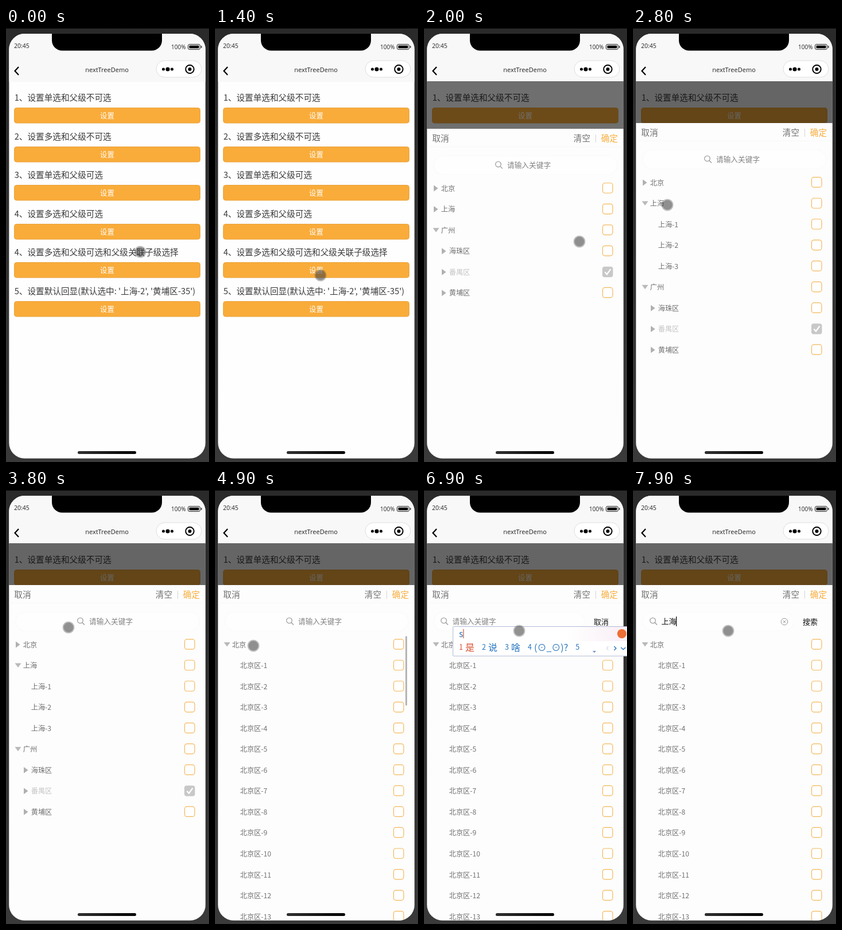
Recreate the animation shown at these times as an HTML page with a canvas. Size 354 by 758 pixels, loop 8000 ms.

```html
<!DOCTYPE html>
<html lang="zh">
<head>
<meta charset="utf-8">
<title>nextTreeDemo</title>
<style>
  html, body { margin: 0; width: 100%; height: 100%; overflow: hidden; background: #333; }
  canvas { display: block; width: 354px; height: 758px; }
</style>
</head>
<body>
<canvas></canvas>
<script>
const W = 354, H = 758, LOOP = 8000, STEP = 100;
const CJK = '"Noto Sans CJK SC", "Noto Sans CJK", sans-serif';
const LATIN = '"Open Sans", "Noto Sans", sans-serif';
const ORANGE = '#f9ac3a', GRAY = '#707070', BLUE = '#2373bd', RED = '#d9502e';
const SHEET_TOP = 166, ROW = 36.53;

const canvas = document.querySelector('canvas');
const ctx = canvas.getContext('2d');
const ratio = window.devicePixelRatio || 1;
canvas.width = W * ratio;
canvas.height = H * ratio;

// Pointer path: [time, x, y]
const PATH = [
  [0, 234, 391], [900, 190, 443], [1400, 184, 432], [1700, 184, 432],
  [2000, 271, 373], [2600, 60, 309], [3000, 60, 309], [3500, 95, 375],
  [3800, 109, 240], [3900, 121, 227], [4400, 67, 272], [5000, 67, 272],
  [5300, 98, 260], [5400, 130, 198], [5500, 130, 198], [5800, 166, 246], [LOOP, 166, 246]
];
const KEY_TIMES = [6900, 7000, 7100, 7200, 7300, 7400, 7600, 7700];
const POPUP_START = 1770, POPUP_LENGTH = 310;
const SHANGHAI_OPEN = 2800, BEIJING_OPEN = 4500, SCROLLBAR_END = 5400;
const SEARCH_FOCUS = 6100, COMMIT = 7800;

function text(str, x, y, size, color, align = 'left', family = CJK) {
  ctx.font = `${size}px ${family}`;
  ctx.fillStyle = color;
  ctx.textAlign = align;
  ctx.textBaseline = 'middle';
  // CJK glyphs sit slightly below the font's nominal middle.
  ctx.fillText(str, x, family === CJK ? y - size * 0.045 : y);
}

function box(x, y, w, h, r, fill, stroke, line = 1) {
  ctx.beginPath();
  ctx.roundRect(x, y, w, h, r);
  if (fill) { ctx.fillStyle = fill; ctx.fill(); }
  if (stroke) { ctx.strokeStyle = stroke; ctx.lineWidth = line; ctx.stroke(); }
}

function circle(x, y, r, fill, stroke, line = 1) {
  box(x - r, y - r, 2 * r, 2 * r, r, fill, stroke, line);
}

function polyline(points, color, line) {
  ctx.beginPath();
  points.forEach(([x, y]) => ctx.lineTo(x, y));
  ctx.strokeStyle = color;
  ctx.lineWidth = line;
  ctx.stroke();
}

function triangle(points, color) {
  ctx.beginPath();
  points.forEach(([x, y]) => ctx.lineTo(x, y));
  ctx.fillStyle = color;
  ctx.fill();
}

function gradient(x0, y0, x1, y1, from, to) {
  const fill = ctx.createLinearGradient(x0, y0, x1, y1);
  fill.addColorStop(0, from);
  fill.addColorStop(1, to);
  return fill;
}

function drawHeader() {
  box(0, 0, W, 94, 0, '#f8f8f8');
  box(80, 2, 192, 37.5, [0, 0, 18, 18], '#000');
  text('20:45', 14, 32, 10.5, '#222', 'left', LATIN);
  text('100%', 288, 34.2, 10, '#222', 'left', LATIN);
  box(317.5, 28.5, 21, 9, 2.5, null, '#222');
  box(319.5, 30.5, 17, 5, 1, '#000');
  box(340, 31, 1.5, 4, 1, '#222');
  polyline([[22, 68], [15.5, 75], [22, 82]], '#000', 2.2);
  text('nextTreeDemo', 176, 74, 11, '#222', 'center', LATIN);
  box(262, 57, 79, 29, 14.5, '#fff', '#dedede');
  [[274.5, 2.5], [282, 3.6], [289.5, 2.5]].forEach(([x, r]) => circle(x, 72, r, '#000'));
  circle(320.5, 72, 7.2, null, '#000', 2);
  circle(320.5, 72, 3, '#000');
}

function drawPage() {
  const titles = ['1、设置单选和父级不可选', '2、设置多选和父级不可选', '3、设置单选和父级可选',
    '4、设置多选和父级可选', '4、设置多选和父级可选和父级关联子级选择',
    "5、设置默认回显(默认选中: '上海-2', '黄埔区-35')"];
  titles.forEach((title, i) => {
    const y = Math.round(122 + i * 67.55);
    text(title, 14.7, y, 14.64, '#3a3a3a');
    box(14.5, y + 17.5, 324, 26.5, 4, ORANGE, '#e9a33c');
    text('设置', 176.5, y + 31.4, 12.4, '#fff', 'center');
  });
}

function treeRows(t) {
  const leaves = (name, count) =>
    Array.from({ length: count }, (_, i) => ({ name: `${name}-${i + 1}`, level: 1, leaf: true }));
  const beijing = t >= BEIJING_OPEN, shanghai = t >= SHANGHAI_OPEN;
  return [
    { name: '北京', level: 0, open: beijing },
    ...(beijing ? leaves('北京区', 13) : []),
    { name: '上海', level: 0, open: shanghai },
    ...(shanghai ? leaves('上海', 3) : []),
    { name: '广州', level: 0, open: true },
    { name: '海珠区', level: 1 },
    { name: '番禺区', level: 1, disabled: true },
    { name: '黄埔区', level: 1 }
  ];
}

function drawRow(row, y) {
  const x = 16 + row.level * 14;
  if (row.open) triangle([[x - 0.5, y - 4], [x + 10.5, y - 4], [x + 5, y + 3.5]], '#b9b9b9');
  else if (!row.leaf) triangle([[x + 1, y - 5.5], [x + 8.5, y], [x + 1, y + 5.5]], '#b0b0b0');
  text(row.name, x + 13.7, y + 0.6, 12.2, row.disabled ? '#c4c4c4' : GRAY);
  if (row.disabled) {
    box(311, y - 9.5, 18.5, 18.5, 4, '#c8c8c8');
    polyline([[315.5, y], [319, y + 4], [325.5, y - 5]], '#fff', 2.2);
  } else {
    box(311.5, y - 9.3, 17.5, 17.5, 4, '#fff', '#f5b75a', 1.2);
  }
}

function drawMagnifier(x, y) {
  circle(x - 1, y - 1, 4.8, null, '#8f8f8f', 1.1);
  polyline([[x + 2.5, y + 2.5], [x + 6.5, y + 6.5]], '#8f8f8f', 1.1);
}

function drawSearch(t) {
  const active = t >= SEARCH_FOCUS, committed = t >= COMMIT;
  box(17, 213, active ? 263 : 320, 33, 16.5, '#fefefe', '#f9f9f9');
  drawMagnifier(active ? 35.5 : 130.5, 229);
  if (committed) {
    text('上海', 49.5, 230, 13, '#111');
    circle(264, 230, 5.8, null, '#999');
    polyline([[261.7, 227.7], [266.3, 232.3]], '#999', 1);
    polyline([[266.3, 227.7], [261.7, 232.3]], '#999', 1);
  } else {
    text('请输入关键字', active ? 49.5 : 145, 229.5, 12.7, '#808080');
  }
  if (active) text(committed ? '搜索' : '取消', 296, 230.2, 13, '#111');
  if (committed) box(75, 221, 1.2, 17, 0, '#000');
  else if (t >= 6200 && t < 6700) box(50, 221, 1.2, 17, 0, '#000');
}

function drawPopup(t) {
  const p = Math.min(1, Math.max(0, (t - POPUP_START) / POPUP_LENGTH));
  if (!p) return;
  box(0, 93, W, H, 0, `rgba(0,0,0,${0.6 * (1 - (1 - p) ** 2)})`);
  ctx.save();
  ctx.beginPath();
  ctx.rect(0, 93, W, H);
  ctx.clip();
  ctx.translate(0, 586 * (1 - p) ** 3);
  box(0, SHEET_TOP, W, H, 0, '#fdfdfd');
  text('取消', 14.3, 183, 14.64, '#707070');
  text('清空', 260.8, 183, 14.64, '#707070');
  box(299, 176, 1, 14, 0, '#d5d5d5');
  text('确定', 308.8, 183, 14.64, ORANGE);
  box(5, 197, 343, 1, 0, '#f7f7f7');
  drawSearch(t);
  treeRows(t).forEach((row, i) => drawRow(row, 270 + i * ROW));
  if (t >= BEIJING_OPEN && t < SCROLLBAR_END) box(332, 255, 3, 121.5, 1.5, '#b5b5b5');
  ctx.restore();
}

function candidatesFor(typed) {
  if (typed === 's') return ['是', '说', '啥', '(⊙_⊙)?', ''];
  if (typed.length < 4) return ['是', '上', '说', '时', '啥'];
  if (typed.length < 6) return ['上', '商', '伤', '尚', '赏'];
  return ['上海', '伤害', '商海', '上'];
}

function drawInputMethod(t) {
  if (t < KEY_TIMES[0] || t >= COMMIT) return;
  const typed = 'shanghai'.slice(0, KEY_TIMES.filter(key => t >= key).length);
  box(50.5, 238.5, 310, 51.5, 1, '#fff', '#b3b9d6');
  box(250, 239, 110, 25, 0, gradient(250, 0, W, 0, '#fff', '#f8eef5'));
  text(typed, 61, 251.5, 15.5, BLUE);
  box(61 + ctx.measureText(typed).width, 243, 1.2, 16, 0, RED);
  let x = 61;
  candidatesFor(typed).forEach((word, i) => {
    const color = i ? BLUE : RED;
    text(i + 1, x, 275, 12.5, color);
    text(word, x + 11, 275.2, 16, color);
    x += 24 + ctx.measureText(word).width;
  });
  triangle([[294, 281], [300, 281], [297, 284.5]], '#7a94c8');
  polyline([[321.5, 273], [318.5, 276.5], [321.5, 280]], '#d8dcec', 1.3);
  polyline([[331.5, 273], [335, 276.5], [331.5, 280]], BLUE, 1.4);
  polyline([[343.5, 275], [347.5, 278.5], [351.5, 275]], BLUE, 1.4);
  circle(345, 251, 8, '#ec6f35');
}

function drawPointer(t) {
  const i = PATH.findIndex(([time]) => time > t);
  const [t0, x0, y0] = PATH[i - 1], [t1, x1, y1] = PATH[i];
  const u = (t - t0) / (t1 - t0), e = u * u * (3 - 2 * u);
  const x = x0 + (x1 - x0) * e, y = y0 + (y1 - y0) * e;
  circle(x, y, 10.5, 'rgba(60,60,60,.32)');
  circle(x, y, 8.5, 'rgba(60,60,60,.36)');
}

function draw(t) {
  ctx.setTransform(ratio, 0, 0, ratio, 0, 0);
  box(0, 0, W, H, 0, gradient(0, 0, 0, H, '#2a2a2a', '#3a3a3a'));
  box(0, 0, W, 1, 0, '#000');
  ctx.save();
  ctx.beginPath();
  ctx.roundRect(5.3, 10, 342.5, 741.7, 27);
  ctx.clip();
  box(0, 0, W, H, 0, '#fefefe');
  drawHeader();
  drawPage();
  drawPopup(t);
  box(125, 739, 102, 5, 2.5, gradient(125, 0, 227, 0, '#303030', '#000'));
  ctx.restore();
  drawInputMethod(t);
  drawPointer(t);
}

const start = performance.now();
function tick() {
  const t = (performance.now() - start) % LOOP;
  draw(Math.floor(t / STEP) * STEP);
  requestAnimationFrame(tick);
}
tick();
</script>
</body>
</html>
```
